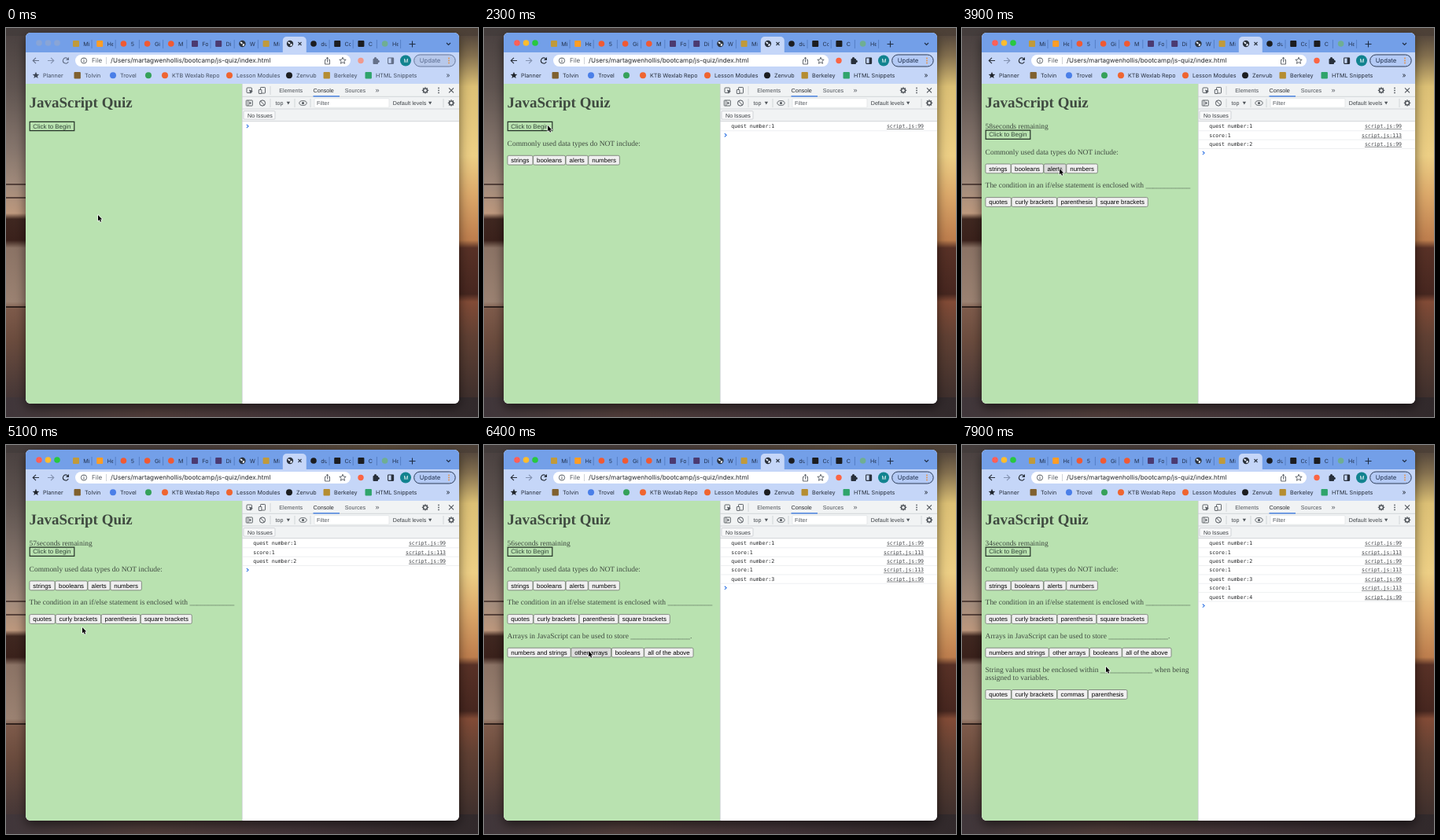
These frames come from a looping animation (600x495 px, 8000 ms). An HTML page with a canvas:

```html
<!DOCTYPE html>
<html lang="en">
<head>
<meta charset="utf-8">
<title>JavaScript Quiz</title>
<style>
html, body { margin: 0; width: 100%; height: 100%; overflow: hidden; background: #3c2b27; }
canvas { display: block; width: 600px; height: 495px; }
</style>
</head>
<body>
<canvas id="stage"></canvas>
<script>
const W = 600, H = 495, LOOP = 8000;
const canvas = document.getElementById('stage');
const dpr = window.devicePixelRatio || 1;
canvas.width = W * dpr;
canvas.height = H * dpr;
const c = canvas.getContext('2d');

const UI = 'Inter, "Open Sans", sans-serif';
const SANS = '"Liberation Sans", Arial, sans-serif';
const SERIF = '"Liberation Serif", "Times New Roman", serif';
const MONO = '"DejaVu Sans Mono", monospace';
const INK = '#3f4a40';

// Moments of the session, in ms
const FOCUS = 900, BEGIN = 1700, ANSWERS = [3600, 5700, 6900];

const questions = [
  { lines: ['Commonly used data types do NOT include:'],
    answers: ['strings', 'booleans', 'alerts', 'numbers'] },
  { lines: ['The condition in an if/else statement is enclosed with ' + '_'.repeat(12)],
    answers: ['quotes', 'curly brackets', 'parenthesis', 'square brackets'] },
  { lines: ['Arrays in JavaScript can be used to store ' + '_'.repeat(16) + '.'],
    answers: ['numbers and strings', 'other arrays', 'booleans', 'all of the above'] },
  { lines: ['String values must be enclosed within ' + '_'.repeat(14) + ' when being', 'assigned to variables.'],
    answers: ['quotes', 'curly brackets', 'commas', 'parenthesis'] }
];

// Pointer stops: time, x, y
const path = [
  [0, 117, 238], [250, 117, 238], [950, 81, 124], [2500, 81, 124],
  [3350, 124, 179], [4100, 124, 179], [4750, 97, 232], [5150, 97, 232],
  [5550, 146, 221], [5800, 146, 221], [6250, 133, 262], [7100, 133, 262],
  [7600, 183, 282], [8000, 183, 282]
];

function pointer(t) {
  const i = Math.max(1, path.findIndex(p => p[0] > t));
  const [t0, x0, y0] = path[i - 1], [t1, x1, y1] = path[i];
  const u = (t - t0) / (t1 - t0), e = u * u * (3 - 2 * u);
  return { x: x0 + (x1 - x0) * e, y: y0 + (y1 - y0) * e };
}

function text(s, x, y, size, family, color, weight = '') {
  c.font = `${weight} ${size}px ${family}`;
  c.fillStyle = color;
  c.fillText(s, x, y);
}

function box(x, y, w, h, fill, r = 0, stroke, lw = 1) {
  c.beginPath();
  c.roundRect(x, y, w, h, r);
  if (fill) { c.fillStyle = fill; c.fill(); }
  if (stroke) { c.strokeStyle = stroke; c.lineWidth = lw; c.stroke(); }
}

function dot(x, y, r, fill) {
  c.beginPath();
  c.arc(x, y, r, 0, Math.PI * 2);
  c.fillStyle = fill;
  c.fill();
}

function ring(x, y, r, color, lw = 1, from = 0, to = Math.PI * 2) {
  c.beginPath();
  c.arc(x, y, r, from, to);
  c.strokeStyle = color;
  c.lineWidth = lw;
  c.stroke();
}

function line(color, lw, ...pts) {
  c.beginPath();
  for (let i = 0; i < pts.length; i += 2) c.lineTo(pts[i], pts[i + 1]);
  c.strokeStyle = color;
  c.lineWidth = lw;
  c.stroke();
}

function poly(fill, ...pts) {
  c.beginPath();
  for (let i = 0; i < pts.length; i += 2) c.lineTo(pts[i], pts[i + 1]);
  c.closePath();
  c.fillStyle = fill;
  c.fill();
}

function fade(x, y, w, h, stops, across) {
  const g = across ? c.createLinearGradient(x, 0, x + w, 0) : c.createLinearGradient(0, y, 0, y + h);
  stops.forEach(([p, color]) => g.addColorStop(p, color));
  c.fillStyle = g;
  c.fillRect(x, y, w, h);
}

function star(x, y, r, fill, stroke) {
  c.beginPath();
  for (let i = 0; i < 10; i++) {
    const a = -Math.PI / 2 + i * Math.PI / 5, d = i % 2 ? r * 0.45 : r;
    c.lineTo(x + d * Math.cos(a), y + d * Math.sin(a));
  }
  c.closePath();
  if (fill) { c.fillStyle = fill; c.fill(); }
  else { c.strokeStyle = stroke; c.lineWidth = 0.9; c.stroke(); }
}

function globe(x, y) {
  dot(x, y, 4.2, '#2c333d');
  c.fillStyle = '#e8eefb';
  c.beginPath();
  c.ellipse(x - 1.2, y - 1.2, 1.8, 1, 0.6, 0, 7);
  c.ellipse(x + 1.5, y + 1.5, 1.2, 1.6, 0.4, 0, 7);
  c.fill();
}

function gear(x, y) {
  ring(x, y, 2.5, '#50555b', 1.5);
  for (let i = 0; i < 8; i++) {
    const a = i * Math.PI / 4, p = Math.cos(a), q = Math.sin(a);
    line('#50555b', 1.3, x + p * 3, y + q * 3, x + p * 4.2, y + q * 4.2);
  }
}

function desktop() {
  fade(0, 6, 40, 489, [[0, '#4a4140'], [0.14, '#5f5450'], [0.3, '#85756c'], [0.4, '#a38c7c'],
    [0.47, '#bd987d'], [0.485, '#3f2720'], [0.54, '#3a211b'], [0.56, '#8b7365'], [0.7, '#9b8272'],
    [0.72, '#7d5a4a'], [0.8, '#6b4c3e'], [0.92, '#4d3b38'], [1, '#3b3236']]);
  fade(560, 6, 40, 489, [[0, '#50433a'], [0.06, '#84704f'], [0.14, '#dcc075'], [0.32, '#edcf85'],
    [0.42, '#dca96a'], [0.54, '#bd7d4d'], [0.56, '#583126'], [0.68, '#46261f'], [0.7, '#824b36'],
    [0.79, '#604033'], [1, '#342a2a']]);
  fade(0, 0, W, 10, [[0, '#443d3c'], [0.4, '#463b38'], [0.8, '#574839'], [1, '#4c4037']], true);
  fade(0, 470, W, 25, [[0, '#40363a'], [0.3, '#503d3a'], [0.6, '#443539'], [1, '#31292b']], true);
  line('#2a1a18', 1.3, 0, 199, 25, 199);
  line('#2a1a18', 1.3, 0, 216, 25, 216);
  line('#1d1210', 1.6, 0, 355, 25, 355);
  c.save();
  c.shadowColor = 'rgba(0,0,0,.55)';
  c.shadowBlur = 14 * dpr;
  c.shadowOffsetY = 5 * dpr;
  box(25, 6, 551, 472, '#fff', 6);
  c.restore();
}

function tabs(active) {
  box(25, 6, 551, 30, '#739fe8');
  const lights = active ? ['#ff5f57', '#febc2e', '#28c840'] : Array(3).fill('#89a5d6');
  lights.forEach((color, i) => dot(42 + i * 11.5, 19, 3.8, color));
  const gold = '#c09a3b', red = '#f05a33', violet = '#4b3a70', black = '#1c1d20';
  const list = [['Mi', gold, 1], ['He', '#ff9d25', 1], ['5', red], ['Gi', red], ['M', red],
    ['Fo', violet, 1], ['Di', violet, 1], ['W'], ['Mi', gold, 1], null,
    ['du', black], ['Co', black, 1], ['C', black, 1], ['He', '#6fae93']];
  list.forEach((tab, i) => {
    const x = 89 + i * 30.2;
    if (!tab) {
      box(x - 9, 11, 30, 24, '#c5d6f8', [5, 5, 0, 0]);
      globe(361, 20);
      line('#2e3744', 1.1, 371.5, 18, 375.5, 22);
      line('#2e3744', 1.1, 375.5, 18, 371.5, 22);
      return;
    }
    const [label, color, square] = tab;
    if (!color) globe(x, 20);
    else if (square) box(x - 4, 16, 8, 8, color, 1);
    else dot(x, 20, 3.8, color);
    c.save();
    c.beginPath();
    c.rect(x + 8, 12, 9, 18);
    c.clip();
    text(label, x + 9.3, 22.8, 7.2, UI, '#22324f');
    c.restore();
    if (i !== 8) line('#4f77bd', 0.8, x + 20, 15, x + 20, 26);
  });
  line('#1f2c42', 1.1, 512.5, 20.5, 520.5, 20.5);
  line('#1f2c42', 1.1, 516.5, 16.5, 516.5, 24.5);
  line('#1f2c42', 1.1, 560, 19, 562.5, 21.5, 565, 19);
}

function toolbar(active) {
  const ink = active ? '#29303b' : '#65718a', soft = '#8392b0';
  box(25, 31, 551, 40, '#c5d6f8');
  for (const [x, d, color] of [[38, 1, ink], [57, -1, soft]]) {
    line(color, 1.1, x + 4 * d, 41.5, x - 3.6 * d, 41.5);
    line(color, 1.1, x, 37.8, x - 3.8 * d, 41.5, x, 45.2);
  }
  ring(76, 41.5, 3.5, ink, 1.2, 0.4, 5.5);
  poly(ink, 80, 37, 80, 41, 76, 41);

  box(88, 34, 350, 15, '#fff', 7.5);
  ring(99, 41.5, 3.6, '#50565e', 0.9);
  line('#50565e', 1, 99, 41, 99, 43.6);
  dot(99, 39.6, 0.6, '#50565e');
  text('File', 109, 44.4, 8, UI, '#5b6168');
  line('#c3c7cd', 0.8, 127.5, 37, 127.5, 46);
  text('/Users/martagwenhollis/bootcamp/js-quiz/index.html', 133, 44.4, 8.08, UI, '#23262b');
  line('#555b63', 0.9, 407, 40.5, 405.5, 40.5, 405.5, 46, 411.5, 46, 411.5, 40.5, 410, 40.5);
  line('#555b63', 0.9, 408.5, 43.5, 408.5, 37.5);
  line('#555b63', 0.9, 406.8, 39.2, 408.5, 37.3, 410.2, 39.2);
  star(428, 41.7, 4.4, null, '#555b63');

  dot(451, 41.5, 3.7, active ? '#fb6543' : '#f09a8d');
  box(466.5, 39, 6.5, 7, ink, 1);
  dot(469.5, 38.7, 1.6, ink);
  dot(473.2, 42.4, 1.6, ink);
  box(485.6, 38, 7, 7.4, null, 0.8, ink, 1.1);
  box(489.6, 38, 3, 7.4, ink);
  dot(508, 41.5, 7, '#12838f');
  text('M', 505.4, 44, 6.6, UI, '#fff');
  box(518.7, 34, 52.5, 15, active ? '#b4caf5' : '#b7c8ea', 7.5, active ? '#2c3c59' : '#66779b', 1);
  text('Update', 525.8, 44.3, 7.7, UI, active ? '#1d2e4c' : '#5a6c90');
  for (const dy of [-3, 0, 3]) dot(563, 41.5 + dy, 0.9, '#e8934a');

  star(38, 60.3, 4.5, active ? '#1f242c' : '#3c4656');
  const marks = [
    [47, 'Planner'], [100, 'Tolvin', '#80612f', 1], [145, 'Trovel', '#4a7fe8'], [190, '', '#35a15a'],
    [211, 'KTB Wexlab Repo', '#ef6531'], [293, 'Lesson Modules', '#ef6531'],
    [369, 'Zenvub', '#1b1d21'], [417, 'Berkeley', '#b58d32', 1], [470, 'HTML Snippets', '#2fa46b', 1]
  ];
  const label = active ? '#252d3a' : '#414c5e';
  for (const [x, name, color, square] of marks) {
    if (square) box(x - 13.5, 56, 8.4, 8.4, color, 1);
    else if (color) dot(x - 9, 60.2, 4, color);
    text(name, x, 62.9, 7.2, UI, label);
  }
  text('»', 559.5, 62.9, 8.5, UI, label);
}

function answers(list, y, mouse) {
  let x = 29.6;
  for (const label of list) {
    c.font = `7.89px ${SANS}`;
    const w = c.measureText(label).width + 9.5;
    const over = mouse.x >= x && mouse.x < x + w && mouse.y >= y && mouse.y < y + 12.5;
    box(x + 0.3, y + 0.3, w - 0.6, 11.8, over ? '#dcdcdc' : '#f0f0f0', 1.7, '#70756f', 0.8);
    text(label, x + 4.75, y + 9, 7.89, SANS, '#000');
    x += w;
  }
}

function page(t, mouse) {
  box(25, 71, 275, 407, '#b9e2b0', [0, 0, 0, 6]);
  text('JavaScript Quiz', 29.6, 101.2, 18.94, SERIF, INK, 'bold');
  const ticks = Math.floor((t - BEGIN) / 1000);
  let y = 119;
  if (ticks > 0) {
    const left = 60 - ticks - (t > ANSWERS[2] && ticks > 5 ? 20 : 0);
    text(left + 'seconds remaining', 29.6, 128, 9.47, SERIF, INK);
    y += 10.7;
  }
  box(30.2, y + 0.4, 56.6, 11.3, null, 0, '#263329', 1.2);
  text('Click to Begin', 34.3, y + 8.7, 7.89, SANS, '#33483a');
  if (t < BEGIN) return;
  y += 31;
  const shown = 1 + ANSWERS.filter(a => t >= a).length;
  for (const q of questions.slice(0, shown)) {
    q.lines.forEach((s, i) => text(s, 29.6, y + i * 10.7, 9.47, SERIF, INK));
    y += (q.lines.length - 1) * 10.7;
    answers(q.answers, y + 12, mouse);
    y += 42.6;
  }
}

function devtools(t) {
  box(300, 71, 276, 407, '#fff', [0, 0, 6, 0]);
  box(300, 71, 276, 48, '#f1f3f4');
  for (const y of [87.3, 103, 118.7]) line('#cbced2', 0.8, 300, y, 576, y);
  line('#cbced2', 0.8, 300.3, 71, 300.3, 478);
  const grey = '#50555b';

  box(306, 76, 6.5, 6.5, null, 1, grey, 0.9);
  poly(grey, 309, 78.5, 314, 80.3, 311.8, 81.3, 310.8, 83.8);
  box(323.5, 75.5, 6, 7.5, null, 0.7, grey, 0.9);
  box(321.3, 78.5, 3.6, 5, '#f1f3f4', 0.5, grey, 0.9);
  line('#cbced2', 0.8, 336, 74, 336, 85);
  text('Elements', 347.3, 82.1, 7.15, SANS, '#4b5056');
  text('Console', 390.6, 82.1, 7.15, SANS, '#24272b');
  text('Sources', 430.8, 82.1, 7.15, SANS, '#4b5056');
  text('»', 469.5, 82, 9, SANS, grey);
  box(390.5, 86.2, 33.5, 1.4, '#2f73e0');
  gear(533, 79.4);
  for (const dy of [-3, 0, 3]) dot(550, 79.4 + dy, 0.85, grey);
  line(grey, 1.1, 563, 76.4, 569, 82.4);
  line(grey, 1.1, 569, 76.4, 563, 82.4);

  box(305.3, 92, 8, 7, null, 0.6, grey, 0.9);
  line(grey, 0.8, 307.7, 92, 307.7, 99);
  poly(grey, 309.3, 93.5, 312, 95.5, 309.3, 97.5);
  ring(326, 95.5, 3.6, grey, 1);
  line(grey, 1, 323.5, 93, 328.5, 98);
  line('#cbced2', 0.8, 336, 90, 336, 101);
  text('top', 342.5, 98, 7.1, SANS, '#3c4045');
  poly(grey, 356.7, 93.8, 361, 93.8, 358.85, 97.4);
  line('#cbced2', 0.8, 367, 90, 367, 101);
  c.beginPath();
  c.ellipse(377.5, 95.5, 4.6, 2.9, 0, 0, 7);
  c.strokeStyle = grey;
  c.lineWidth = 0.9;
  c.stroke();
  dot(377.5, 95.5, 1.5, grey);
  line('#cbced2', 0.8, 387, 90, 387, 101);
  box(392, 89.7, 95, 11.5, '#fff', 1, '#dfe1e4', 0.7);
  text('Filter', 395, 98, 7.1, SANS, '#4f545a');
  text('Default levels', 491.8, 98, 7.1, SANS, '#3c4045');
  poly(grey, 537, 93.8, 541.3, 93.8, 539.15, 97.4);
  line('#cbced2', 0.8, 556, 90, 556, 101);
  gear(566, 95.4);
  box(302, 105.7, 40, 10.4, '#f8f9fa', 1, '#c8cbd0', 0.8);
  text('No Issues', 307, 113.6, 7.15, SANS, '#34383c');

  const log = t < BEGIN ? [] : [['quest number:1', 99]];
  ANSWERS.forEach((at, i) => {
    if (t >= at) log.push(['score:1', 113], ['quest number:' + (i + 2), 99]);
  });
  log.forEach(([msg, row], i) => {
    const y = 127.3 + i * 11.37;
    text(msg, 314.3, y, 6.53, MONO, '#222426');
    const link = 'script.js:' + row;
    const w = c.measureText(link).width;
    text(link, 559 - w, y, 6.53, MONO, '#44474b');
    line('#44474b', 0.6, 559 - w, y + 1.3, 559, y + 1.3);
    line('#e6e8eb', 0.7, 300.8, y + 3.5, 576, y + 3.5);
  });
  const y = 125 + log.length * 11.37;
  line('#3a7be6', 1.1, 305.8, y - 2.1, 308.2, y, 305.8, y + 2.1);
  if (t >= FOCUS && t < BEGIN) line('#222', 0.9, 314.5, y - 3.7, 314.5, y + 3.7);
}

function arrow({ x, y }) {
  c.beginPath();
  const shape = [0, 0, 0, 7.6, 1.7, 6, 2.9, 8.8, 4.2, 8.2, 3, 5.5, 5.3, 5.5];
  for (let i = 0; i < shape.length; i += 2) c.lineTo(x + shape[i], y + shape[i + 1]);
  c.closePath();
  c.lineJoin = 'round';
  c.strokeStyle = '#fff';
  c.lineWidth = 1.3;
  c.stroke();
  c.fillStyle = '#000';
  c.fill();
  c.lineJoin = 'miter';
}

function draw(now) {
  const t = now % LOOP, mouse = pointer(t), active = t >= FOCUS;
  c.setTransform(dpr, 0, 0, dpr, 0, 0);
  c.textRendering = 'geometricPrecision';
  desktop();
  c.save();
  c.beginPath();
  c.roundRect(25, 6, 551, 472, 6);
  c.clip();
  tabs(active);
  toolbar(active);
  page(t, mouse);
  devtools(t);
  c.restore();
  arrow(mouse);
}

const start = performance.now();
function tick() {
  draw(performance.now() - start);
  requestAnimationFrame(tick);
}
tick();
</script>
</body>
</html>
```
